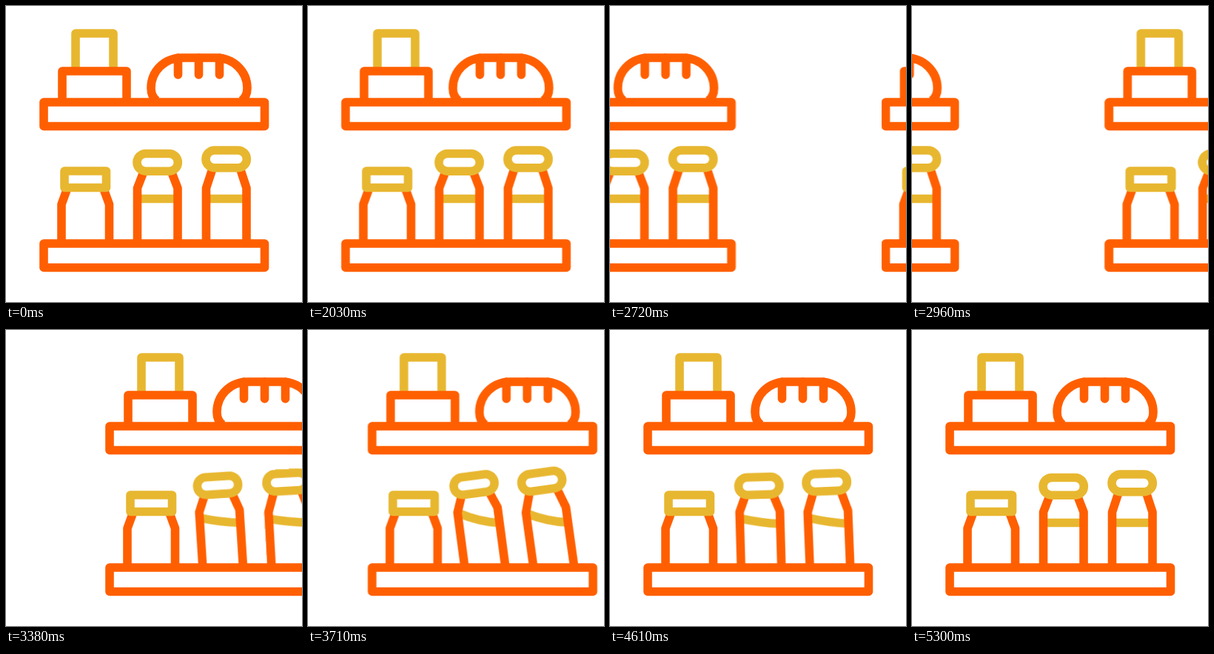
These frames come from a looping animation (400x400 px, 5.33 s). An HTML page:

```html
<!DOCTYPE html>
<html lang="en">
<head>
<meta charset="utf-8">
<title>Shelves</title>
<style>
  html, body { margin: 0; width: 100%; height: 100%; overflow: hidden; background: #fff; }
  svg { display: block; width: 100vw; height: 100vh; }
  path, rect { fill: none; stroke: #ff5f00; stroke-width: 11.6; stroke-linejoin: round; }
  .gold { stroke: #e8b730; }
  .board { fill: #fff; }
  .round { stroke-linecap: round; }

  #track { animation: slide 5330ms infinite; }
  .jar {
    transform-origin: 177.5px 330px;
    animation: tilt 5330ms var(--lag) infinite;
  }
  .level { animation: slosh 5330ms var(--lag) infinite; }
  .first { --lean: -7.8deg; --lag: 0ms; }
  .second { --lean: -8.6deg; --lag: 50ms; }

  @keyframes slide {
    0%, 37.52% { transform: translateX(0); animation-timing-function: cubic-bezier(.333, 0, .3, 1); }
    82.55%, 100% { transform: translateX(-507px); }
  }
  @keyframes tilt {
    0%, 56.29% { transform: rotate(0deg); animation-timing-function: cubic-bezier(.333, 0, .667, 1); }
    71.29% { transform: rotate(var(--lean)); animation-timing-function: cubic-bezier(.333, 0, .667, 1); }
    92.87%, 100% { transform: rotate(0deg); }
  }
  @keyframes slosh {
    0%, 56.29% {
      d: path("M178 260.5Q205 260.5 232 260.5");
      animation-timing-function: cubic-bezier(.333, 0, .667, 1);
    }
    71.29% {
      d: path("M178 246Q205 262.5 232 267.5");
      animation-timing-function: cubic-bezier(.333, 0, .667, 1);
    }
    98.5%, 100% { d: path("M178 260.5Q205 260.5 232 260.5"); }
  }
</style>
</head>
<body>
<svg viewBox="0 0 400 400">
  <g id="track">
    <g id="shelves">
      <!-- upper shelf -->
      <path class="gold" d="M94 83V37H145V83"/>
      <path d="M76 130V88H163V130"/>
      <path d="M204 128C198 124 196 117 196 111C196 88 214 70 238 70H284C307 70 326 88 326 111C326 117 324 124 318 128"/>
      <path class="round" d="M232.5 70V93M260.5 70V93M288.5 70V93"/>
      <rect class="board" x="51" y="130" width="298.5" height="32.5"/>

      <!-- lower shelf -->
      <path d="M83 246L75 268V321M131.5 246L139.5 268V321"/>
      <rect class="gold" x="79" y="223" width="56.5" height="22.5"/>
      <g class="first">
        <g class="jar">
          <path class="gold level" d="M178 260.5Q205 260.5 232 260.5"/>
          <path d="M186 224L177.5 246V330M223.5 224L232 246V330"/>
          <rect class="gold" x="177" y="199.5" width="55.3" height="23.7" rx="11.8"/>
        </g>
      </g>
      <g class="second" transform="translate(93)">
        <g class="jar">
          <path class="gold level" d="M178 260.5Q205 260.5 232 260.5"/>
          <path d="M186 220L177.5 246V330M223.5 220L232 246V330"/>
          <rect class="gold" x="177" y="195" width="55.3" height="23.7" rx="11.8"/>
        </g>
      </g>
      <rect class="board" x="51" y="321" width="298.5" height="32.5"/>
    </g>
  </g>
</svg>
<script>
  // The incoming set follows the outgoing one at a fixed distance.
  const shelves = document.getElementById('shelves');
  const next = shelves.cloneNode(true);
  next.removeAttribute('id');
  next.setAttribute('transform', 'translate(507)');
  shelves.after(next);
</script>
</body>
</html>
```
